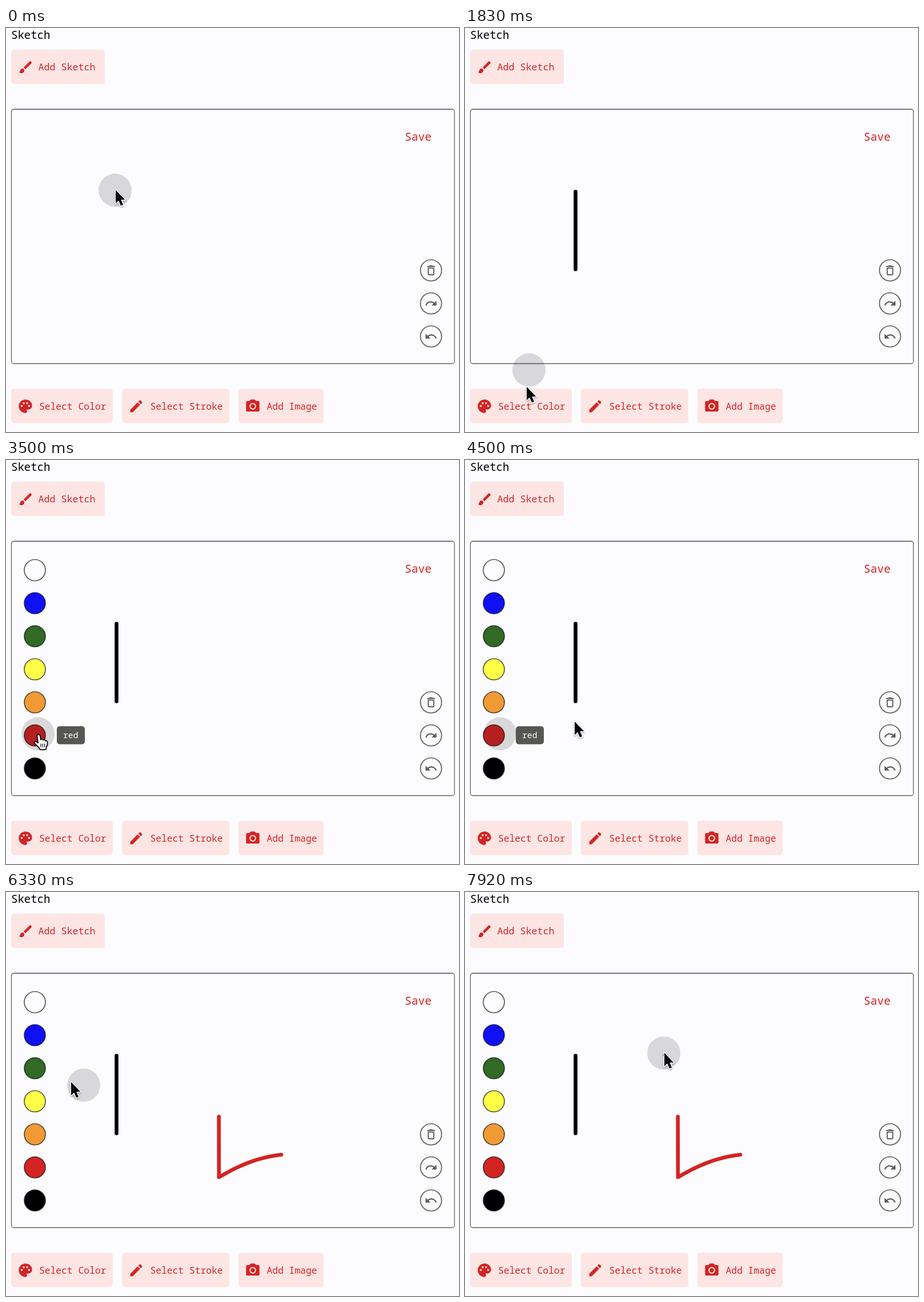
Write an HTML page with a canvas that moves like this. It is 793 by 706 pixels and loops after 8000 ms.

```html
<!DOCTYPE html>
<html lang="en">
<head>
<meta charset="utf-8">
<title>Sketch</title>
<style>
  html, body { margin: 0; width: 100%; height: 100%; overflow: hidden; background: #fcfcff; }
  canvas { display: block; }
</style>
</head>
<body>
<canvas id="stage" width="793" height="706"></canvas>
<script>
const ctx = document.getElementById('stage').getContext('2d');
const LOOP = 8000, FPS = 12;
const RED = '#d32424', INK = '#5c5c55', MONO = '"Noto Sans Mono", "DejaVu Sans Mono", monospace';

const icons = {
  brush: 'M7 14c-1.66 0-3 1.34-3 3 0 1.31-1.16 2-2 2 .92 1.22 2.49 2 4 2 2.21 0 4-1.79 4-4 0-1.66-1.34-3-3-3zm13.71-9.37l-1.34-1.34a1 1 0 0 0-1.41 0L9 12.25 11.75 15l8.96-8.96c.39-.39.39-1.02 0-1.41z',
  palette: 'M12 2C6.49 2 2 6.49 2 12s4.49 10 10 10c1.38 0 2.5-1.12 2.5-2.5 0-.61-.23-1.2-.64-1.67-.08-.1-.13-.21-.13-.33 0-.28.22-.5.5-.5H16c3.31 0 6-2.69 6-6 0-4.96-4.49-9-10-9z',
  pencil: 'M3 17.25V21h3.75L17.81 9.94l-3.75-3.75zM20.71 7.04c.39-.39.39-1.02 0-1.41l-2.34-2.34a1 1 0 0 0-1.41 0l-1.83 1.83 3.75 3.75z',
  camera: 'M9 2L7.17 4H4c-1.1 0-2 .9-2 2v12c0 1.1.9 2 2 2h16c1.1 0 2-.9 2-2V6c0-1.1-.9-2-2-2h-3.17L15 2zm3 15a5 5 0 0 1 0-10 5 5 0 0 1 0 10z',
  trash: 'M6 19c0 1.1.9 2 2 2h8c1.1 0 2-.9 2-2V7H6zM8 9h8v10H8zm7.5-5l-1-1h-5l-1 1H5v2h14V4z',
  redo: 'M18.4 10.6C16.55 8.99 14.15 8 11.5 8c-4.65 0-8.58 3.03-9.96 7.22L3.9 16c1.05-3.19 4.05-5.5 7.6-5.5 1.95 0 3.73.72 5.12 1.88L13 16h9V7z',
  undo: 'M12.5 8c-2.65 0-5.05.99-6.9 2.6L2 7v9h9l-3.62-3.62c1.39-1.16 3.16-1.88 5.12-1.88 3.54 0 6.55 2.31 7.6 5.5l2.37-.78C21.08 11.03 17.15 8 12.5 8z'
};
for (const name in icons) icons[name] = new Path2D(icons[name]);
const arrow = new Path2D('M0 0V23.5L5.2 18.6 9 27.6 13 25.9 9.2 17.1H16.2Z');
const hand = new Path2D('M-2.6 1.8C-2.6-1.2 2.2-1.2 2.6 1.8L3.8 9C4.6 7 7.5 7.2 8 9.6C9 8 11.5 8.5 12 11C13.5 10 15.5 11 15.6 13C15.8 18 14.5 20 13.5 22L13 26H3C1 22-3 19-6.5 15.5C-9 12.5-6 10.5-3.5 12.5L-.8 14.5Z');

const swatches = ['#fdfdff', '#1010f5', '#306a25', '#ffff48', '#f09a35', RED, '#000'];
const swatchX = 50.5, swatchY = i => 192.5 + i * 57.75;
const colorButton = { x: 9, y: 630, w: 178, h: 60.5 };

// Pointer tip: step, x, y
const track = [
  [6, 192, 283], [7, 192, 292], [8, 192, 330], [9, 192, 378], [10, 192, 410], [11, 192, 422],
  [15, 192, 422], [17, 182, 440], [19, 149, 503], [21, 113, 597], [22, 108, 627], [23, 104, 648],
  [25, 101, 662], [34, 101, 662], [36, 96, 615], [37, 87, 560], [38, 75, 525], [40, 60, 484],
  [41, 57, 478], [52, 57, 478], [53, 62, 478], [54, 192, 457], [55, 270, 455], [57, 345, 439],
  [58, 358, 411], [60, 371, 392], [61, 372, 391], [62, 372, 397], [63, 372, 440], [64, 372, 479],
  [65, 372, 483], [66, 373, 498], [67, 420, 474], [68, 445, 466], [69, 470, 460], [70, 482, 459],
  [72, 482, 459], [73, 440, 452], [75, 137, 337], [76, 114, 332], [78, 66, 310], [79, 61, 307],
  [88, 61, 307], [89, 70, 307], [90, 250, 298], [91, 343, 286], [92, 348, 283], [93, 349, 281]
];

const clamp = v => Math.max(0, Math.min(1, v));

function pointerAt(step) {
  const next = track.findIndex(p => p[0] >= step);
  if (next <= 0) return (next ? track[track.length - 1] : track[0]).slice(1);
  const [s0, x0, y0] = track[next - 1], [s1, x1, y1] = track[next];
  const u = (step - s0) / (s1 - s0);
  return [x0 + (x1 - x0) * u, y0 + (y1 - y0) * u];
}

function disc(x, y, r, fill, stroke) {
  ctx.beginPath();
  ctx.arc(x, y, r, 0, 2 * Math.PI);
  if (fill) { ctx.fillStyle = fill; ctx.fill(); }
  if (stroke) { ctx.strokeStyle = stroke; ctx.lineWidth = 1.7; ctx.stroke(); }
}

function box(x, y, w, h, r) {
  ctx.beginPath();
  ctx.roundRect(x, y, w, h, r);
}

function text(str, x, y, size, color, weight = 400) {
  ctx.font = `${weight} ${size}px ${MONO}`;
  ctx.fillStyle = color;
  ctx.fillText(str, x, y);
}

function icon(name, cx, cy, scale, color) {
  ctx.save();
  ctx.translate(cx, cy);
  ctx.scale(scale, scale);
  ctx.translate(-12, -12);
  ctx.fillStyle = color;
  ctx.fill(icons[name], 'evenodd');
  if (name === 'palette') {
    for (const [x, y] of [[6.5, 11.5], [9.5, 7.5], [14.5, 7.5], [17.5, 11.5]]) disc(x, y, 1.5, '#fde5e4');
  }
  if (name === 'camera') disc(12, 12, 3.2, color);
  ctx.restore();
}

function button(x, y, w, label, textX, size, name, iconX) {
  box(x, y, w, 60, 5);
  ctx.fillStyle = '#fde5e4';
  ctx.fill();
  icon(name, iconX, y + 30.5, 1.17, RED);
  text(label, textX, y + 36, size, RED);
}

function ripple(step) {
  if (step < 29 || step >= 38) return;
  const grow = 1 - (1 - clamp((step - 28) / 5)) ** 2;
  ctx.save();
  box(colorButton.x, colorButton.y, colorButton.w, colorButton.h, 5);
  ctx.clip();
  disc(98.5, 661, 74 * grow, `rgba(211,36,36,${0.08 * clamp((38 - step) / 4)})`);
  ctx.restore();
}

function scene() {
  ctx.fillStyle = '#fcfcff';
  ctx.fillRect(0, 0, 793, 706);
  text('Sketch', 9, 19, 19, '#000');
  button(9, 38, 164, 'Add Sketch', 56.5, 16.7, 'brush', 34.5);
  button(9, 630.5, 178, 'Select Color', 58, 16.3, 'palette', 34);
  button(203, 630.5, 188, 'Select Stroke', 252.5, 16.3, 'pencil', 228);
  button(407, 630.5, 149, 'Add Image', 456.5, 16.3, 'camera', 432);
  box(9.5, 142, 775.5, 444.5, 4);
  ctx.strokeStyle = '#62625e';
  ctx.lineWidth = 1.3;
  ctx.stroke();
  ctx.fillStyle = '#716a88';
  ctx.fillRect(14, 141.3, 767, 1.4);
  text('Save', 698, 196.5, 19.6, RED);
  ['trash', 'redo', 'undo'].forEach((name, i) => {
    const y = swatchY(i + 4);
    disc(744, y, 18.5, null, INK);
    icon(name, 744, y, 0.96, INK);
  });
}

function stroke(color, trace) {
  ctx.beginPath();
  trace();
  ctx.strokeStyle = color;
  ctx.lineWidth = 6.6;
  ctx.lineCap = ctx.lineJoin = 'round';
  ctx.stroke();
}

function drawings(step, x, y) {
  if (step >= 7) stroke('#000', () => {
    ctx.moveTo(193.5, 286);
    ctx.lineTo(193.5, step < 11 ? Math.max(286.1, y) : 421.7);
  });
  if (step >= 62) stroke(RED, () => {
    ctx.moveTo(372.6, 392.5);
    ctx.lineTo(372.8, step < 66 ? y : 498.5);
    if (step < 67) return;
    // Partial quadratic: follow the bow up to the pointer
    const u = step < 70 ? clamp((x - 373) / 109) : 1;
    const bow = v => [373 + 109 * v, (1 - v) ** 2 * 498.5 + 2 * v * (1 - v) * 465 + v * v * 459];
    for (let i = 1; i <= 20; i++) ctx.lineTo(...bow(u * i / 20));
  });
  if (step >= 94) disc(350, 285, 3.4, swatches[2]);
}

function tooltip(label, i, alpha) {
  if (alpha <= 0) return;
  const y = swatchY(i);
  ctx.save();
  ctx.globalAlpha = alpha;
  box(89, y - 16, 22 + label.length * 9, 31.5, 5);
  ctx.fillStyle = '#565652';
  ctx.fill();
  text(label, 100, y + 5, 14.7, '#fff', 500);
  ctx.restore();
}

const fade = (step, start, end) => Math.min(clamp((step - start) / 2), clamp((end - step) / 3));

function pointer(x, y, step) {
  const onButton = x > 9 && x < 187 && y > 630;
  const onSwatch = step >= 31 && swatches.some((c, i) => Math.hypot(x - swatchX, y - swatchY(i)) < 19);
  ctx.save();
  ctx.translate(x, y);
  ctx.lineJoin = ctx.lineCap = 'round';
  ctx.shadowColor = 'rgba(0,0,0,.35)';
  ctx.shadowBlur = 3;
  ctx.shadowOffsetY = 1.5;
  if (onButton || onSwatch) {
    ctx.translate(0, 2);
    ctx.fillStyle = '#fff';
    ctx.fill(hand);
    ctx.shadowColor = 'transparent';
    ctx.strokeStyle = '#000';
    ctx.lineWidth = 1.6;
    ctx.stroke(hand);
    ctx.beginPath();
    for (const fx of [4, 7.3, 10.6]) {
      ctx.moveTo(fx, 16);
      ctx.lineTo(fx + 0.2, 21.5);
    }
    ctx.lineWidth = 1.2;
    ctx.stroke();
  } else {
    ctx.strokeStyle = '#fff';
    ctx.lineWidth = 3;
    ctx.stroke(arrow);
    ctx.shadowColor = 'transparent';
    ctx.fillStyle = '#000';
    ctx.fill(arrow);
  }
  ctx.restore();
}

function draw(now) {
  const step = Math.floor(((now + 5) % LOOP) * FPS / 1000);
  const [x, y] = pointerAt(step), [haloX, haloY] = pointerAt(step - 1);
  scene();
  ripple(step);
  drawings(step, x, y);
  if (step >= 31) swatches.forEach((c, i) => disc(swatchX, swatchY(i), 18.5, c, 'rgba(0,0,0,.65)'));
  tooltip('red', 5, fade(step, 40, 57));
  tooltip('green', 2, fade(step, 78, 93));
  disc(haloX - 1, haloY + 0.5, 29, 'rgba(0,0,0,.145)');
  pointer(x, y, step);
  requestAnimationFrame(draw);
}
draw(0);
</script>
</body>
</html>
```
